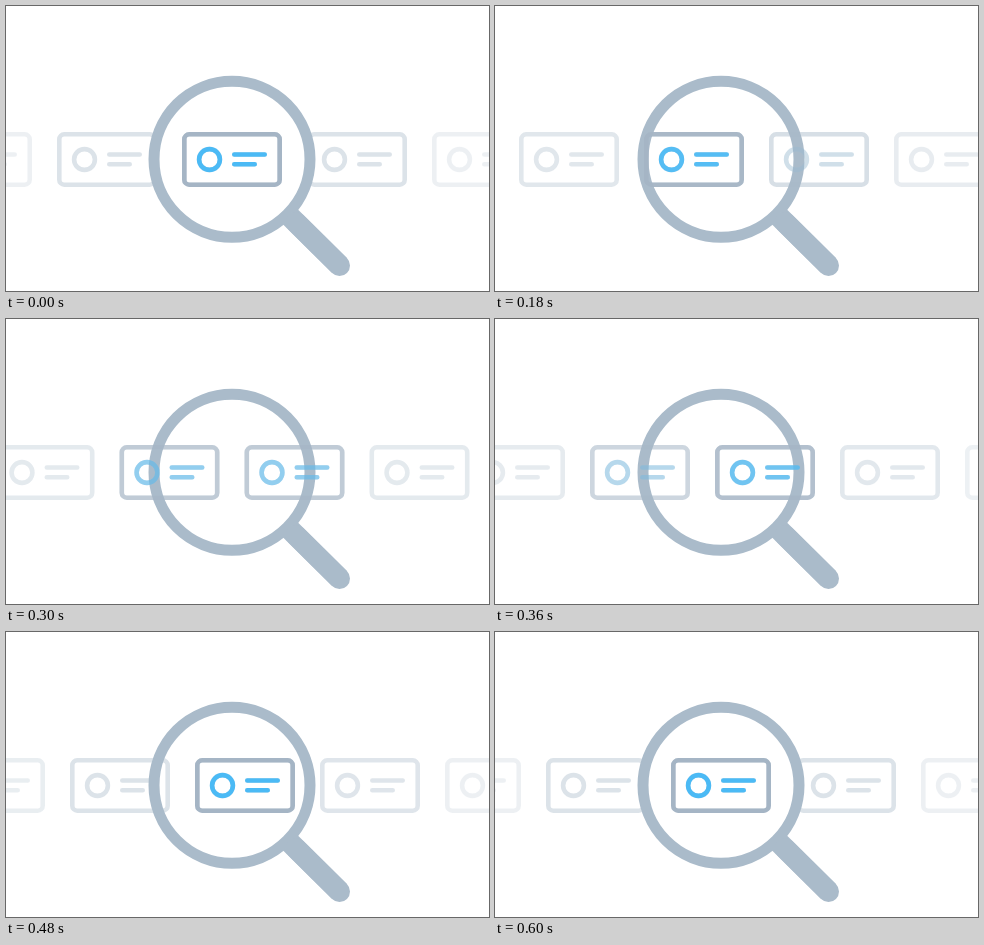
Write an HTML page that moves like this. It is 483 by 285 pixels and loops after 1.2 s.

```html
<!DOCTYPE html>
<html lang="en">
<head>
<meta charset="utf-8">
<title>Card search</title>
<style>
html, body { margin: 0; width: 100%; height: 100%; overflow: hidden; background: #fff; }
svg { display: block; width: 483px; height: 285px; }
.pale { --edge: #dce3e9; --mark: #dce3e9; }
.lit { --edge: #a5b5c5; --mark: #4bbaf5; }
</style>
</head>
<body>
<svg viewBox="0 0 483 285" fill="none" stroke-linecap="round">
  <defs>
    <g id="card" stroke-width="4.6">
      <rect x="2.3" y="2.3" width="95.4" height="50.4" rx="5" stroke="var(--edge)"/>
      <g stroke="var(--mark)">
        <circle cx="27.5" cy="27.5" r="10.4"/>
        <path d="M52.3 22.5H82.7M52.3 32.3H72.7"/>
      </g>
    </g>
  </defs>
  <g id="under"></g>
  <g stroke="#aabbca">
    <circle cx="226" cy="153.3" r="78" stroke-width="11"/>
    <path d="M284 210.5L333.5 259.5" stroke-width="21" stroke-linecap="butt"/>
    <path d="M290 216.4L333.5 259.5" stroke-width="21"/>
  </g>
  <g id="over"></g>
</svg>
<script>
const LOOP = 1200, MOVE = 600, STEP = 30, GAP = 125, HOME = 176, TOP = 126;

const clamp = v => Math.min(1, Math.max(0, v));
const smooth = v => v * v * (3 - 2 * v);

function addCard(layer, look) {
  const use = document.createElementNS('http://www.w3.org/2000/svg', 'use');
  use.setAttribute('href', '#card');
  use.setAttribute('class', look);
  document.getElementById(layer).append(use);
  return use;
}

// slot: place in the row, from/to: opacity, rate: speed of the fade
const pale = [
  { slot: -2, from: 0.5, to: 0, rate: 2 },
  { slot: -1, from: 1, to: 0.5, rate: 1 },
  { slot: 0, from: 1, to: 1, rate: 1 },
  { slot: 1, from: 1, to: 1, rate: 1 },
  { slot: 2, from: 0.5, to: 1, rate: 1 },
  { slot: 3, from: 0, to: 0.5, rate: 2 }
].map(c => ({ ...c, el: addCard('under', 'pale') }));
const lit = [0, 1].map(slot => ({ slot, el: addCard('over', 'lit') }));

function place(card, shift, alpha) {
  const x = HOME + card.slot * GAP - shift;
  card.el.setAttribute('transform', `translate(${x.toFixed(2)} ${TOP})`);
  card.el.setAttribute('opacity', alpha.toFixed(3));
}

function draw(now) {
  const time = Math.floor((now % LOOP) / STEP + 0.001) * STEP;
  const t = clamp(time / MOVE);
  const shift = GAP * smooth(t);
  const swap = smooth(clamp((t - 0.2) / 0.6));
  for (const c of pale) place(c, shift, c.from + (c.to - c.from) * clamp(t * c.rate));
  for (const c of lit) place(c, shift, c.slot ? swap : 1 - swap);
}

let start;
function tick(now) {
  start ??= now;
  draw(now - start);
  requestAnimationFrame(tick);
}
draw(0);
requestAnimationFrame(tick);
</script>
</body>
</html>
```
